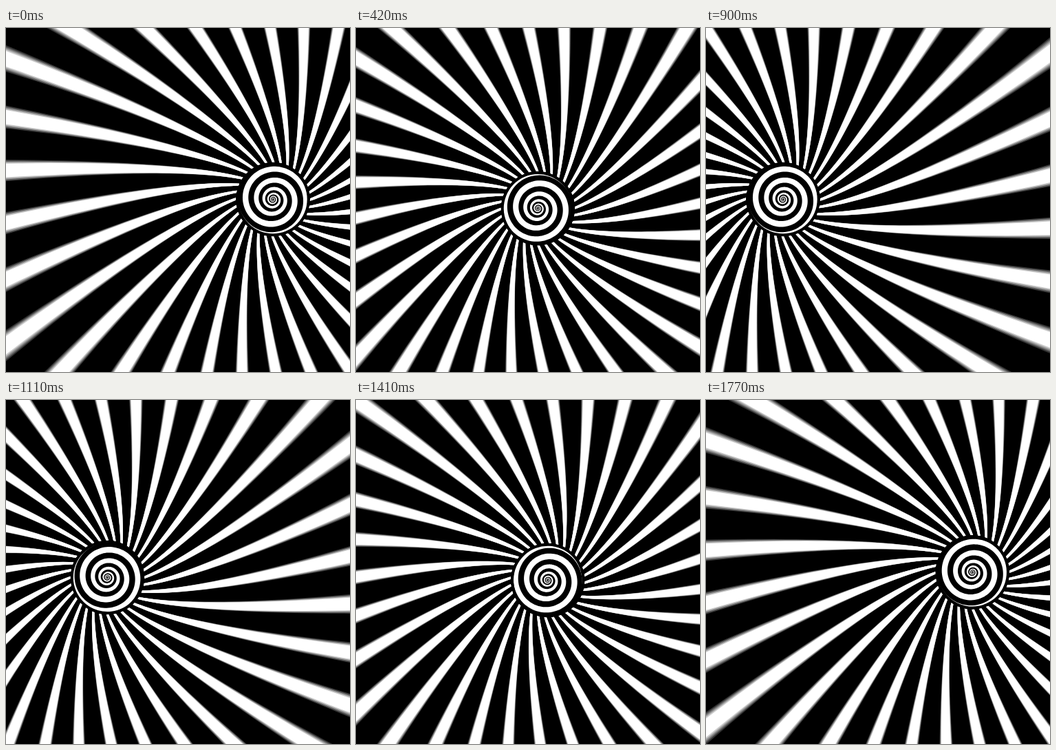
Recreate the animation shown at these times as an HTML page with a canvas. Size 500 px wide and 499 px high, loop 1800 ms.

```html
<!DOCTYPE html>
<html lang="en">
<head>
<meta charset="utf-8">
<title>Hypnotic swirl</title>
<style>
html, body { margin: 0; width: 100%; height: 100%; overflow: hidden; background: #000; }
canvas { display: block; width: 500px; height: 499px; }
</style>
</head>
<body>
<canvas id="stage" width="500" height="499"></canvas>
<script>
const ctx = document.getElementById('stage').getContext('2d');
const DEG = Math.PI / 180;
const LOOP = 1800, STEP = 30, FRAMES = LOOP / STEP;
const RAYS = 32, PITCH = 360 / RAYS;
const RIM = 54, REACH = 520;
const BALL = 53, FACE = 49.7, GROWTH = 1.9;

function polar(path, r, deg) {
  path.lineTo(r * Math.cos(deg * DEG), r * Math.sin(deg * DEG));
}

// Curved rays; soft in -1..1 widens or narrows them to blur the far edges
function makeRays(soft) {
  const path = new Path2D();
  const bend = r => -10.55 + 330 / Math.sqrt(r);
  const half = r => PITCH * 0.168 + soft * 0.45 * Math.min(r / 400, 1.2);
  const radii = [];
  for (let r = RIM; r < REACH; r *= 1.06) radii.push(r);
  radii.push(REACH);
  const back = radii.slice().reverse();
  for (let k = 0; k < RAYS; k++) {
    const ray = new Path2D();
    radii.forEach(r => polar(ray, r, k * PITCH + bend(r) - half(r)));
    back.forEach(r => polar(ray, r, k * PITCH + bend(r) + half(r)));
    ray.closePath();
    path.addPath(ray);
  }
  return path;
}

// Spiral of constant slope on a ball, seen from its pole
function makeSpiral() {
  const path = new Path2D();
  const edge = (n, scale) => {
    const u = Math.min(1, 0.457 * scale * Math.pow(GROWTH, n));
    polar(path, BALL * 2 * u / (1 + u * u), 94 + 360 * n);
  };
  const from = -6, to = 1.3, d = 0.01;
  for (let n = from; n <= to; n += d) edge(n, 1);
  for (let n = to; n >= from; n -= d) edge(n, 1 / Math.sqrt(GROWTH));
  path.closePath();
  return path;
}

const layers = [1, 0.5, 0, -0.5, -1].map((soft, i) => {
  const v = Math.round(255 * (i + 1) / 5);
  return { path: makeRays(soft), color: `rgb(${v},${v},${v})` };
});
const spiral = makeSpiral();
const face = new Path2D();
face.arc(0, 0, FACE, 0, 2 * Math.PI);

function draw(frame) {
  const phase = 2 * Math.PI * frame / FRAMES;
  ctx.setTransform(1, 0, 0, 1, 0, 0);
  ctx.fillStyle = '#000';
  ctx.fillRect(0, 0, 500, 499);
  ctx.translate(250 + 138 * Math.cos(phase), 248.5 + 13.3 * Math.abs(Math.sin(phase)));

  ctx.save();
  ctx.rotate(1.5 * frame * DEG);
  for (const layer of layers) {
    ctx.fillStyle = layer.color;
    ctx.fill(layer.path);
  }
  ctx.restore();

  ctx.save();
  ctx.rotate(12 * frame * DEG);
  ctx.clip(face);
  ctx.fillStyle = '#fff';
  ctx.fill(spiral);
  ctx.restore();
}

const start = performance.now();
function tick() {
  const t = Math.max(0, performance.now() - start) % LOOP;
  draw(Math.floor(t / STEP));
  requestAnimationFrame(tick);
}
tick();
</script>
</body>
</html>
```
